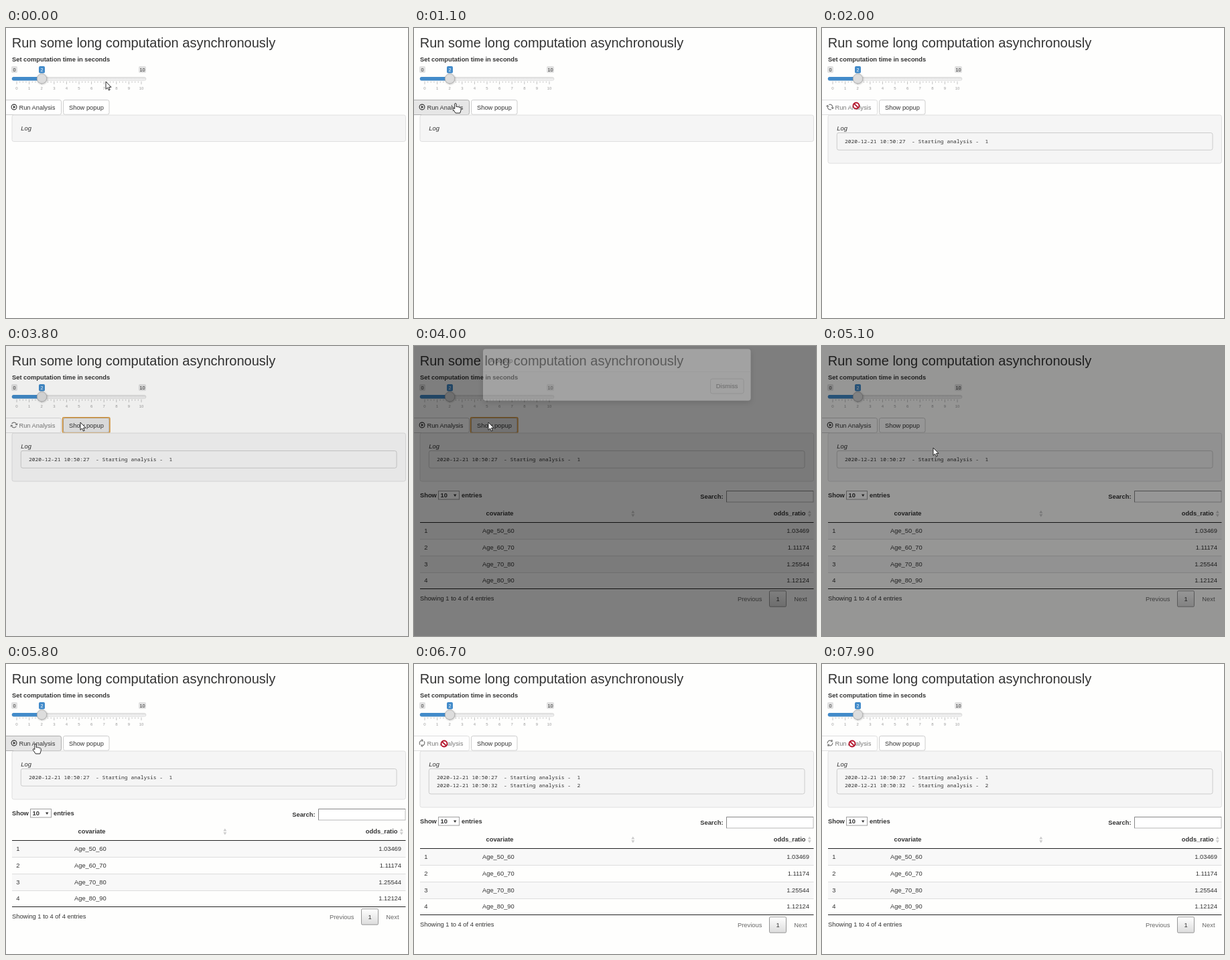
Recreate the animation shown at these times as an HTML page. Size 600 by 433 pixels, loop 8000 ms.

```html
<!DOCTYPE html>
<html lang="en">
<head>
<meta charset="utf-8">
<title>Asynchronous computation</title>
<style>
  html, body { margin: 0; width: 100%; height: 100%; overflow: hidden; background: #fefefd; }
  svg { display: block; width: 100vw; height: 100vh; }
  text { font: 9.33px "Liberation Sans", Arial, sans-serif; fill: #333; white-space: pre; }
  .title { font-size: 20px; }
  .bold { font-weight: bold; }
  .italic { font-style: italic; }
  .mono { font: 7.95px "Noto Sans Mono", "DejaVu Sans Mono", monospace; }
  .tag { font-size: 7.33px; }
  .tick { font-size: 6px; fill: #999; }
  .muted { fill: #666; }
  .white { fill: #fff; }
  .mid { text-anchor: middle; }
  .end { text-anchor: end; }
  .btn { fill: #fff; stroke: #ccc; }
  .btn.on { fill: #e6e6e6; stroke: #adadad; }
  .btn.down { fill: #d4d4d4; stroke: #8c8c8c; }
</style>
</head>
<body>
<svg viewBox="0 0 600 433" preserveAspectRatio="none">
  <defs>
    <linearGradient id="track" x2="0" y2="1"><stop stop-color="#dedede"/><stop offset="1" stop-color="#f6f6f6"/></linearGradient>
    <linearGradient id="page" x2="0" y2="1"><stop stop-color="#fff"/><stop offset="1" stop-color="#dcdcdc"/></linearGradient>
    <filter id="soft" x="-10%" y="-30%" width="120%" height="170%"><feDropShadow dx="0" dy="3" stdDeviation="4" flood-opacity=".5"/></filter>
    <filter id="knob" x="-40%" y="-40%" width="180%" height="180%"><feDropShadow dx=".5" dy=".7" stdDeviation=".9" flood-opacity=".3"/></filter>
  </defs>
  <rect width="600" height="433" fill="#fefefd"/>
  <text class="title" x="8.7" y="29">Run some long computation asynchronously</text>
  <text class="bold" x="9" y="50">Set computation time in seconds</text>

  <g id="slider">
    <rect x="9" y="73.5" width="200" height="5" rx="2.5" fill="url(#track)" stroke="#ccc" stroke-width=".5"/>
    <path d="M53 73H11.5a2.5 2.5 0 0 0 0 5.5H53z" fill="#428bca"/>
    <rect x="8" y="57" width="9" height="10" rx="2" fill="#e1e1e1"/>
    <rect x="49" y="57" width="9" height="10.5" rx="2" fill="#428bca"/>
    <rect x="198" y="57" width="11" height="10" rx="2" fill="#e1e1e1"/>
    <text class="tag mid" x="12.5" y="64.7">0</text>
    <text class="tag mid white" x="53.5" y="64.7">2</text>
    <text class="tag mid" x="203.5" y="64.7">10</text>
    <g id="ticks" stroke="#aaa" stroke-width=".7"></g>
    <circle cx="53.5" cy="75.7" r="7.2" fill="#ddd" stroke="#aaa" stroke-width=".8" filter="url(#knob)"/>
  </g>

  <g id="runGroup">
    <rect id="run" class="btn" x="-6" y="107.5" width="88.5" height="22" rx="2.7"/>
    <g id="play">
      <circle cx="12" cy="118" r="3.9" fill="none" stroke="#333" stroke-width="1.1"/>
      <path d="M10.8 115.8L14.4 118L10.8 120.2Z" fill="#333"/>
    </g>
    <g id="spin">
      <path d="M-3.8 -.6A3.9 3.9 0 0 1 2.9 -2.6M3.8 .6A3.9 3.9 0 0 1 -2.9 2.6" fill="none" stroke="#333" stroke-width="1.2"/>
      <path d="M4.6 -4.5V-.9H1ZM-4.6 4.5V.9H-1Z" fill="#333"/>
    </g>
    <text x="19.4" y="121.6">Run Analysis</text>
  </g>
  <rect id="show" class="btn" x="85.5" y="107.5" width="68.5" height="21.7" rx="2.7"/>
  <rect id="ring" x="84.6" y="106.8" width="70.3" height="23" rx="1.5" fill="none" stroke="#dc9a3c" stroke-width="1.6"/>
  <text x="94" y="121.6">Show popup</text>

  <rect id="well" x="9" y="130" width="587.5" rx="2.7" fill="#f5f5f5" stroke="#e0e0e0"/>
  <text class="italic" x="22.3" y="153">Log</text>
  <g id="log">
    <rect id="pre" x="22.3" y="156.5" width="560.7" rx="2.7" fill="#f5f5f5" stroke="#ccc"/>
    <text class="mono" x="34" y="172.3">2020-12-21 10:50:27  - Starting analysis -  1</text>
    <text class="mono" id="line2" x="34" y="184.3">2020-12-21 10:50:32  - Starting analysis -  2</text>
  </g>

  <g id="table">
    <text class="bold" x="9" y="226">Show</text>
    <rect x="36.5" y="216.5" width="31" height="12.5" fill="#fff" stroke="#a0a0a0"/>
    <text class="bold" x="39.5" y="226">10</text>
    <path d="M59 221.4h4.4l-2.2 3.6z" fill="#333"/>
    <text class="bold" x="71" y="226">entries</text>
    <text class="bold end" x="461.5" y="228">Search:</text>
    <rect x="466.5" y="216.5" width="129.5" height="16.5" fill="#fff" stroke="#b8b8b8"/>
    <path d="M466.5 233V216.5H596" fill="none" stroke="#888"/>
    <text class="bold mid" x="128" y="253.3">covariate</text>
    <text class="bold end" x="584.5" y="253.3">odds_ratio</text>
    <path d="M324.3 249.6l2.5-4 2.5 4zm0 1.6l2.5 4 2.5-4zM587.8 249.6l2.5-4 2.5 4zm0 1.6l2.5 4 2.5-4z" fill="#ccc"/>
    <g id="rows"></g>
    <path d="M9 263.5H596.5M9 362.5H596.5" stroke="#222"/>
    <text x="9" y="380.3">Showing 1 to 4 of 4 entries</text>
    <text class="muted" x="483" y="381">Previous</text>
    <rect x="530.5" y="365.7" width="25" height="23.5" rx="1.5" fill="url(#page)" stroke="#979797"/>
    <text class="mid" x="543.2" y="381">1</text>
    <text class="muted" x="567.3" y="381">Next</text>
  </g>

  <rect id="shade" width="600" height="433"/>
  <g id="modal">
    <rect x="103" width="399.5" height="77" rx="4" fill="#fff" filter="url(#soft)"/>
    <text x="113" y="20.5">A popup</text>
    <path d="M103 34H502.5" stroke="#e5e5e5" stroke-width=".8"/>
    <rect id="dismiss" class="btn" x="442.5" y="44.5" width="49.5" height="22" rx="2.7"/>
    <text class="mid" x="467.2" y="58.7">Dismiss</text>
  </g>

  <g id="cursor">
    <path id="arrow" d="M0 0V11.4L2.6 9L4.4 13L6.2 12.2L4.5 8.3H8Z" fill="#fff" stroke="#111" stroke-width=".9"/>
    <path id="hand" d="M-1.2 1.2Q0 -.6 1.2 1.2V5.6Q2.6 4.6 3.6 5.9Q5 5.1 5.9 6.4Q7.4 5.9 8.2 7.4V10.6L6.8 15H.2L-3.6 9.4Q-4 7.4 -2.4 7.7L-1.2 8.8Z" fill="#fff" stroke="#111" stroke-width=".9"/>
    <g id="ban" fill="none" stroke="#b3122a" stroke-width="1.9">
      <circle r="4.5" fill="#fff"/><path d="M-3.2 -3.2L3.2 3.2"/>
    </g>
  </g>
</svg>
<script>
const LOOP = 8000, STEP = 100;
const NS = 'http://www.w3.org/2000/svg';
const $ = id => document.getElementById(id);

function add(parent, tag, attrs, text) {
  const el = document.createElementNS(NS, tag);
  for (const k in attrs) el.setAttribute(k, attrs[k]);
  if (text !== undefined) el.textContent = text;
  parent.append(el);
}

for (let i = 0; i <= 40; i++) {
  const x = 16 + i * 4.65, major = i % 4 === 0;
  add($('ticks'), 'path', { d: `M${x} 79.7v${major ? 4.4 : 2}` });
  if (major) add($('slider'), 'text', { class: 'tick mid', x, y: 92 }, i / 4);
}

[['Age_50_60', '1.03469'], ['Age_60_70', '1.11174'], ['Age_70_80', '1.25544'], ['Age_80_90', '1.12124']]
  .forEach(([name, ratio], i) => {
    const rows = $('rows'), y = 264 + i * 24.7;
    if (i % 2 === 0) add(rows, 'rect', { x: 9, y, width: 587.5, height: 24.7, fill: '#f8f8f8' });
    if (i) add(rows, 'path', { d: `M9 ${Math.floor(y) + .5}H596.5`, stroke: '#ddd' });
    add(rows, 'text', { x: 15.3, y: y + 15.3 }, i + 1);
    add(rows, 'text', { x: 102, y: y + 15.3 }, name);
    add(rows, 'text', { class: 'end', x: 590, y: y + 15.3 }, ratio);
  });

// Tracks: [time, value...]
const PATH = [[0, 149, 80], [300, 149, 80], [1200, 51, 116], [2800, 51, 116], [3300, 111, 114],
  [4200, 111, 114], [4600, 467, 75], [4800, 467, 75], [5100, 166, 152], [5500, 44, 119],
  [6300, 44, 119], [6600, 45, 119]];
const SHADE = [[3700, 0], [3800, .06], [3900, .34], [4000, .5], [5000, .5], [5100, .41], [5200, .15], [5300, 0]];
const MODAL = [[3900, 0, 1], [4000, .28, 4.5], [4100, .85, 15], [4200, 1, 19], [4300, 1, 20],
  [4700, 1, 20], [4800, .6, 14], [4900, .15, 5], [5000, 0, 1]];

function at(track, t) {
  const i = track.findIndex(p => p[0] > t);
  if (i === 0) return track[0].slice(1);
  if (i < 0) return track[track.length - 1].slice(1);
  const a = track[i - 1], b = track[i], k = (t - a[0]) / (b[0] - a[0]);
  return a.slice(1).map((v, j) => v + (b[j + 1] - v) * k);
}

const within = (t, a, b) => t >= a && t < b;
const visible = (id, on) => { $(id).style.display = on ? '' : 'none'; };
const button = (id, on, down) => $(id).setAttribute('class', 'btn' + (down ? ' down' : on ? ' on' : ''));

function render(t) {
  const [x, y] = at(PATH, t), [shade] = at(SHADE, t), [alpha, top] = at(MODAL, t);
  const busy = within(t, 1700, 4000) || t >= 6000;
  const spinStart = t < 5000 ? 1700 : 6000;
  const inRow = y > 107 && y < 130 && shade === 0;
  const overRun = inRow && x < 83;
  const overShow = inRow && x > 85 && x < 154;
  const overDismiss = alpha === 1 && x > 442 && x < 492 && y > 64 && y < 87;
  const focus = within(t, 3600, 4700);
  const lines = t < 1900 ? 0 : t < 6400 ? 1 : 2;

  button('run', overRun && !busy, within(t, 1500, 1700) || within(t, 5900, 6000));
  $('runGroup').setAttribute('opacity', busy ? .65 : 1);
  visible('play', !busy);
  visible('spin', busy);
  $('spin').setAttribute('transform', `translate(12 118) rotate(${(t - spinStart) * .18})`);
  button('show', overShow || focus, t === 3600);
  visible('ring', focus);

  $('well').setAttribute('height', [39.5, 72, 84][lines]);
  $('pre').setAttribute('height', lines === 2 ? 37.5 : 25.7);
  visible('log', lines > 0);
  visible('line2', lines === 2);
  visible('table', t >= 4000);
  $('table').setAttribute('transform', `translate(0 ${lines === 2 ? 12 : 0})`);

  $('shade').setAttribute('opacity', shade);
  visible('modal', alpha > 0);
  $('modal').setAttribute('opacity', alpha);
  $('modal').setAttribute('transform', `translate(0 ${top})`);
  button('dismiss', overDismiss, overDismiss && t === 4700);

  const kind = overRun && busy ? 'ban' : overRun || overShow || overDismiss ? 'hand' : 'arrow';
  for (const id of ['arrow', 'hand', 'ban']) visible(id, id === kind);
  $('cursor').setAttribute('transform', `translate(${x} ${y})`);
}

const start = performance.now();
function tick() {
  const t = (performance.now() - start) % LOOP;
  render(Math.floor(t / STEP) * STEP);
  requestAnimationFrame(tick);
}
tick();
</script>
</body>
</html>
```
